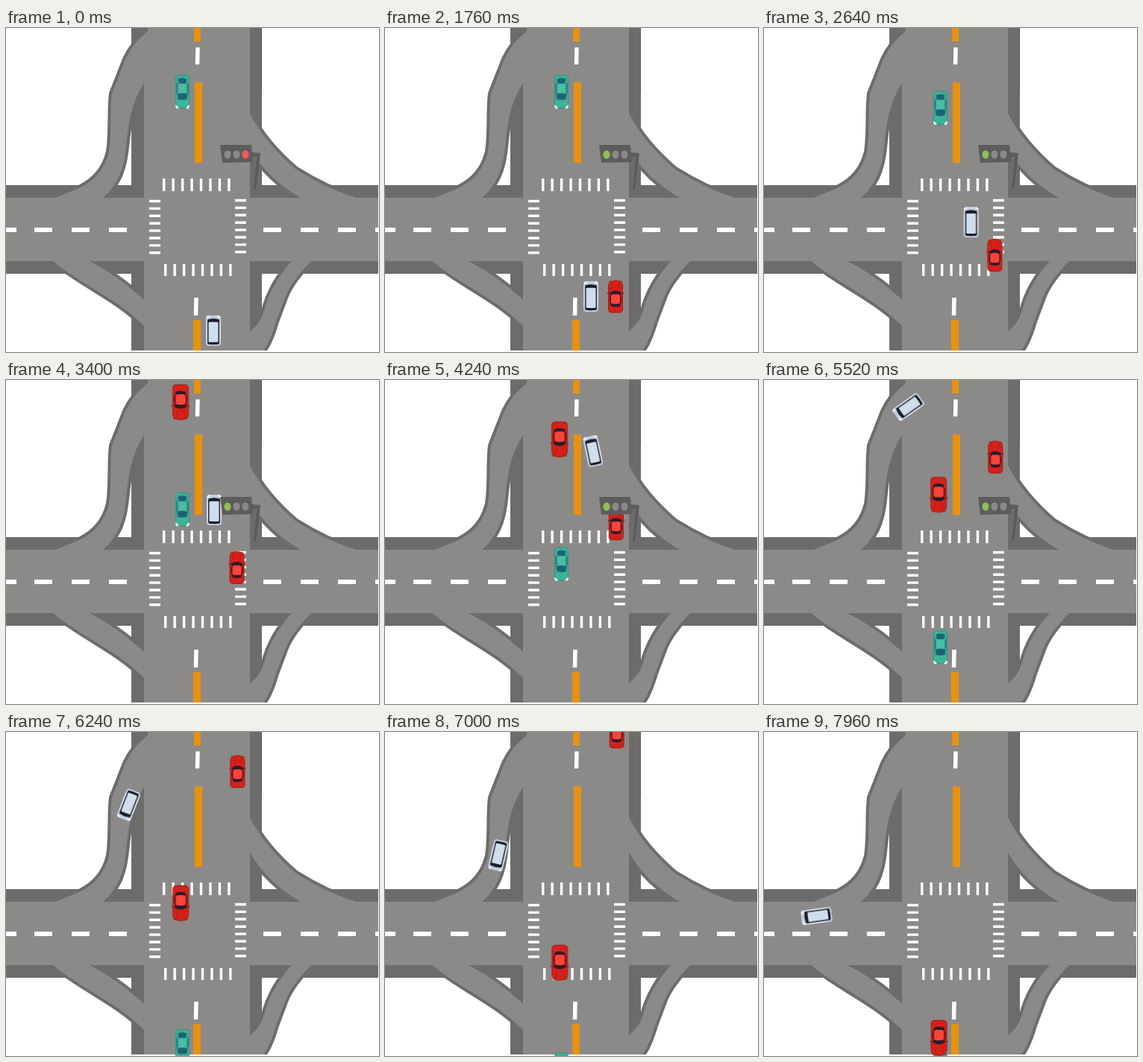
These frames come from a looping animation (500 px wide and 435 px high, 8 s). An HTML page:

```html
<!DOCTYPE html>
<html lang="en">
<head>
<meta charset="utf-8">
<title>Crossroads</title>
<style>
html, body { margin: 0; width: 100%; height: 100%; overflow: hidden; background: #fff; }
svg { display: block; width: 500px; height: 435px; }
.car { animation: 8s linear infinite; }
#white { animation-name: white; }
#red { animation-name: red; }
#teal { animation-name: teal; }
#oncoming { animation-name: oncoming; }
#signal { animation: signal 8s step-end infinite; }
#stop { animation: stop 8s step-end infinite; }
#go { animation: go 8s step-end infinite; }

/* waits, crosses, then turns back onto the left ramp */
@keyframes white {
  0% { transform: translate(278px, 408px) rotate(0deg); }
  8%, 22% { transform: translate(276px, 361px) rotate(0deg); }
  42.5% { transform: translate(279px, 175px) rotate(0deg); }
  48.75% { transform: translate(281px, 127px) rotate(-3deg); }
  53% { transform: translate(279px, 96px) rotate(-12deg); }
  58.25% { transform: translate(264px, 55px) rotate(-40deg); }
  63.5% { transform: translate(233px, 27px) rotate(-92deg); }
  69% { transform: translate(194px, 36px) rotate(-125deg); }
  74% { transform: translate(174px, 68px) rotate(-150deg); }
  80% { transform: translate(160px, 112px) rotate(-163deg); }
  87.5% { transform: translate(152px, 165px) rotate(-167deg); }
  91.5% { transform: translate(139px, 200px) rotate(-150deg); }
  95% { transform: translate(115px, 228px) rotate(-122deg); }
  99.5% { transform: translate(71px, 247px) rotate(-98deg); }
  100% { transform: translate(67px, 248px) rotate(-97deg); }
}
/* pulls up, waits, then crosses at a steady speed */
@keyframes red {
  0% { transform: translate(309px, 464px); }
  17.5%, 23.1% { transform: translate(309px, 360.5px); }
  100% { transform: translate(311px, -70px); }
}
@keyframes teal {
  0%, 29.9% { transform: translate(236.5px, 85.5px); }
  82.5%, 100% { transform: translate(236.5px, 453px); }
}
@keyframes oncoming {
  0%, 33% { transform: translate(234px, -26px); }
  51%, 60.2% { transform: translate(234px, 80px); }
  100% { transform: translate(234.5px, 415px); }
}
@keyframes signal { 0% { opacity: 1; } 71.8%, 100% { opacity: 0; } }
@keyframes stop { 0% { fill: #ff5b55; } 21.8%, 100% { fill: #8c8988; } }
@keyframes go { 0% { fill: #8c8988; } 21.8%, 100% { fill: #8fc050; } }
</style>
</head>
<body>
<svg viewBox="0 0 500 435">
  <defs>
    <g id="ramps">
      <path d="M190 4Q170 20 160 42L142 88C139 110 142 140 138 166Q130 200 98 215L66 228H130C150 210 157 190 160 168C164 140 163 108 186 72Z"/>
      <path d="M327 115C341 142 361 166 389 190Q430 216 472 229H397Q350 203 326 160Z"/>
      <path d="M62 312C100 344 148 362 186 401V366Q150 332 110 312Z"/>
      <path d="M410 312C392 330 380 346 374 362L362 394Q354 422 345 433H326V408Q340 398 346 380C352 356 364 334 384 312Z"/>
    </g>
    <g id="sports">
      <path d="M-8 -20Q0 -23 8 -20L9.5 -15V18Q9 21 6 21.5H-6Q-9 21 -9.5 18V-15Z" fill="#d6211b" stroke="#a01a18"/>
      <path d="M-9 -5L-11 -4M9 -5L11 -4" stroke="#8a1a1a" stroke-width="1.5"/>
      <path d="M-8 -5Q0 -11 8 -5L6 0H-6ZM-7 9L-5 7H5L7 9L6 13Q0 15 -6 13Z" fill="#2c1c28"/>
      <path d="M-8 -2L-6 1V7L-8 9ZM8 -2L6 1V7L8 9Z" fill="#5c1419"/>
      <rect x="-6" y="-3" width="12" height="13" rx="3" fill="#f9443a"/>
      <path d="M-5 -19L-4 -10M5 -19L4 -10" stroke="#b51a17"/>
    </g>
  </defs>

  <g fill="#6d6c6b">
    <path d="M168 0H343V433H168ZM0 211H499V330H0Z"/>
    <use href="#ramps" stroke="#6d6c6b" stroke-width="8"/>
  </g>
  <path d="M342.5 0V86" stroke="#5c5a5b"/>
  <g fill="#8c8a88">
    <path d="M185 0H327V433H185ZM0 228H499V313H0Z"/>
    <use href="#ramps"/>
  </g>
  <path d="M184 0H190V4L184 10Z" fill="#6d6c6b"/>
  <path d="M0 433H500V435H0ZM499 0H500V435H499Z" fill="#fff"/>

  <path d="M252 0H261V18H252ZM253 73H263V181H253ZM251 392H261V433H251Z" fill="#e8920f"/>
  <g fill="none" stroke="#fff">
    <path d="M257 26L256.5 49M255 362L254.5 386" stroke-width="5.5"/>
    <path d="M0 271H14M38 271H62M88 271H112M138 271H162M345 271H369M395 271H419M445 271H469M495 271H499" stroke-width="6"/>
    <g id="crossings" stroke-width="3.4"></g>
  </g>

  <g class="car" id="teal">
    <path d="M-7 -22H7Q9 -21 9 -17V17Q9 21 6 22H-6Q-9 21 -9 17V-17Q-9 -21 -7 -22Z" fill="#3bb598" stroke="#2c8c84"/>
    <path d="M-6 -17Q0 -20 6 -17L5 -11H-5ZM-7 3Q0 1 7 3L6 10Q0 12 -6 10Z" fill="#1f6273"/>
    <path d="M-8 -13L-6 -9V0L-8 4ZM8 -13L6 -9V0L8 4Z" fill="#257680"/>
    <rect x="-5.5" y="-10" width="11" height="12" rx="2" fill="#48bea2"/>
    <path d="M-9 18L-5 22H-8ZM9 18L5 22H8Z" fill="#fff" stroke="#fff"/>
  </g>
  <g class="car" id="oncoming"><use href="#sports" transform="rotate(180) scale(1.09)"/></g>
  <g class="car" id="red"><use href="#sports"/></g>
  <g class="car" id="white">
    <rect x="-10" y="-21" width="20" height="41" rx="4" fill="#c3cfdf"/>
    <path d="M-9 -18L-6 -20M9 -18L6 -20" stroke="#fff" stroke-width="2"/>
    <rect x="-8" y="-16" width="16" height="34" rx="2.5" fill="#262735"/>
    <rect x="-6.5" y="-12" width="13" height="27" rx="1" fill="#cedeed"/>
    <path d="M-9 -10V12M9 -10V12" stroke="#dfe8f1"/>
    <path d="M-7 -14Q0 -17 7 -14M-6 16Q0 18 6 16" fill="none" stroke="#171824" stroke-width="2.5"/>
  </g>

  <g id="signal">
    <path d="M329 167L341 168L340 178L335 217H332L336 173H330Z" fill="#5c5c5d"/>
    <path d="M287 157H329L331 180L290 181Z" fill="#5c5c5d"/>
    <ellipse id="go" cx="297" cy="170" rx="4.5" ry="5.5"/>
    <ellipse cx="309" cy="170" rx="4.5" ry="5.5" fill="#8c8988"/>
    <ellipse id="stop" cx="321" cy="170" rx="4.5" ry="5.5"/>
  </g>
</svg>
<script>
const bars = Array.from({ length: 8 }, (_, i) => {
  const x = 211.7 + 12.45 * i, y = 232.5 + 9.9 * i;
  return `M${x} 202v17M${x + 2} 317v16M192 ${y}h15M307 ${y - 1}h15`;
});
document.getElementById('crossings').innerHTML = `<path d="${bars.join('')}"/>`;
</script>
</body>
</html>
```
